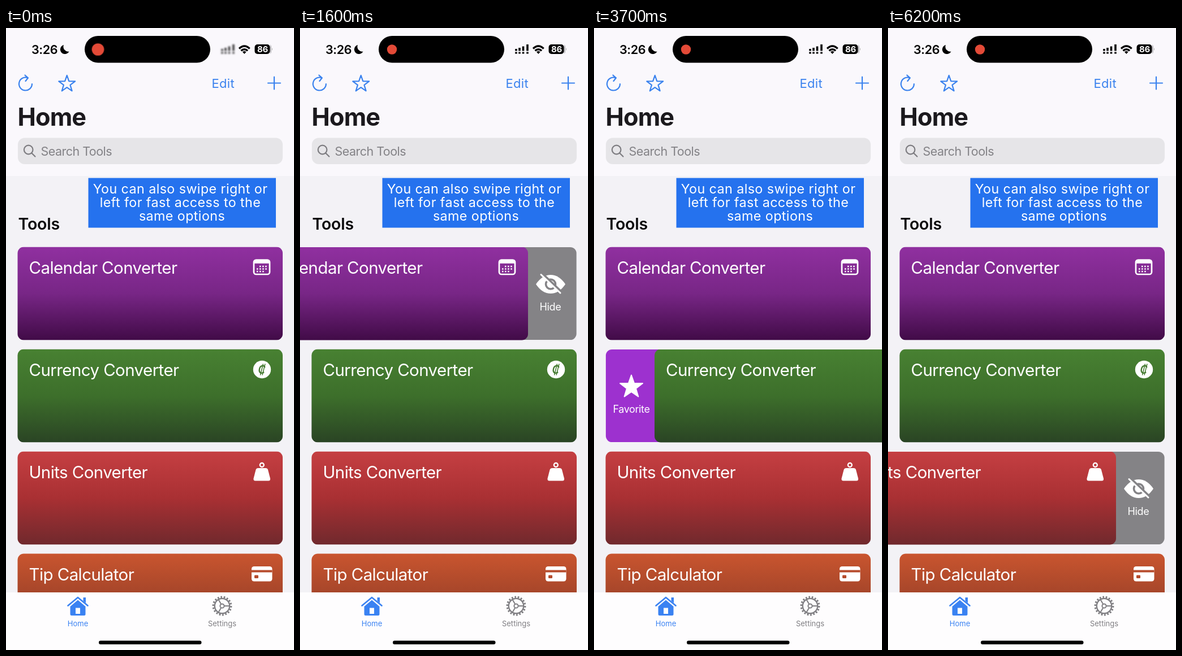
Write an HTML page that moves like this. It is 509x1101 px and loops after 6.3 s.

```html
<!DOCTYPE html>
<html lang="en">
<head>
<meta charset="utf-8">
<title>Swipe actions</title>
<style>
  html, body { margin: 0; width: 100%; height: 100%; overflow: hidden; background: #f3f2f6; }
  svg { display: block; width: 100%; height: 100%; }
  text { font-family: Inter, "Liberation Sans", sans-serif; font-optical-sizing: none; letter-spacing: -.02em; }
  .mid { text-anchor: middle; }
  .title { font-size: 29.5px; fill: #fff; }
  .action { font-size: 18px; fill: #fff; text-anchor: middle; }
  .tab { font-size: 13px; letter-spacing: 0; text-anchor: middle; }
  .banner { font-size: 23.3px; letter-spacing: .4px; fill: #fff; text-anchor: middle; }
  .line { fill: none; stroke: #3a82ee; stroke-width: 2.2; stroke-linecap: round; stroke-linejoin: round; }

  .card, .dot, .signal { animation: 6300ms linear infinite; }
  #calendar { animation-name: calendar; }
  #currency { animation-name: currency; }
  #units { animation-name: units; }
  .dot { animation-name: dot; transform-origin: 162.5px 38px; }
  .signal { animation-name: signal; }

  @keyframes calendar {
    0%, 14.29% { transform: none; animation-timing-function: ease-in-out; }
    22.22%, 50% { transform: translateX(-86px); animation-timing-function: ease-in-out; }
    56.35%, 100% { transform: none; }
  }
  @keyframes currency {
    0%, 46.83% { transform: none; animation-timing-function: ease-out; }
    54.76%, 74.6% { transform: translateX(86.5px); animation-timing-function: ease-in-out; }
    80.95%, 100% { transform: none; }
  }
  @keyframes units {
    0%, 69.4% { transform: none; animation-timing-function: ease-out; }
    77.3%, 100% { transform: translateX(-86px); }
  }
  @keyframes dot {
    0%, 1.5% { transform: scale(1.25); }
    6%, 100% { transform: none; }
  }
  @keyframes signal {
    0%, 1.6% { filter: blur(1.6px); opacity: .75; }
    4%, 100% { filter: none; opacity: 1; }
  }
</style>
</head>
<body>
<svg viewBox="0 0 509 1101" preserveAspectRatio="none">
  <defs>
    <linearGradient id="purple" x2="0" y2="1">
      <stop stop-color="#9030a0"/><stop offset=".5" stop-color="#782686"/><stop offset="1" stop-color="#410b47"/>
    </linearGradient>
    <linearGradient id="green" x2="0" y2="1">
      <stop stop-color="#488132"/><stop offset=".5" stop-color="#3d6f2b"/><stop offset="1" stop-color="#2a4424"/>
    </linearGradient>
    <linearGradient id="red" x2="0" y2="1">
      <stop stop-color="#c53f42"/><stop offset=".5" stop-color="#a93033"/><stop offset="1" stop-color="#70292d"/>
    </linearGradient>
    <linearGradient id="orange" x2="0" y2="1">
      <stop stop-color="#c9552f"/><stop offset=".5" stop-color="#a04329"/><stop offset="1" stop-color="#6a2e20"/>
    </linearGradient>
    <path id="star" d="M0-10 2.35-3.24 9.51-3.09 3.8 1.24 5.88 8.09 0 4-5.88 8.09-3.8 1.24-9.51-3.09-2.35-3.24Z"
      vector-effect="non-scaling-stroke" stroke-linejoin="round"/>
    <g id="hide">
      <rect x="375" y=".4" width="113.6" height="164.2" rx="11" fill="#848386"/>
      <path d="M417 66Q428 49.5 443 49.5T469 66Q458 82.5 443 82.5T417 66Z" fill="#fff"/>
      <circle cx="443" cy="66" r="8.5" fill="none" stroke="#848386" stroke-width="3.6"/>
      <path d="M428.5 47.5 462.500 80" stroke="#848386" stroke-width="4"/>
      <path d="M426 49 460 81.5" stroke="#fff" stroke-width="3" stroke-linecap="round"/>
      <text class="action" x="442.5" y="112.5">Hide</text>
    </g>
    <rect id="face" x="20.5" width="468.5" height="165" rx="11"/>
  </defs>

  <rect width="509" height="1101" fill="#f3f2f6"/>
  <rect width="509" height="262" fill="#faf8fc"/>

  <!-- status bar -->
  <text x="45" y="45.7" font-size="21.6" font-weight="600">3:26</text>
  <path d="M102 30A8.2 8.2 0 1 0 111.5 41.5 8.5 8.5 0 0 1 102 30Z"/>
  <rect x="139" y="14" width="222" height="47.5" rx="23.7"/>
  <circle class="dot" cx="162.5" cy="38" r="8.7" fill="#e34a37"/>
  <g class="signal" stroke="#000" stroke-width="3.6">
    <path d="M382 37v3.5M388 35v5.5M394.5 32.5v8M402 29v11.5"/>
    <path d="M380.2 44h3.6M386.2 44h3.6M392.7 44h3.6M400.2 44h3.6" stroke-width="3.2"/>
  </g>
  <g fill="none" stroke="#000" stroke-width="3.3">
    <path d="M412 36.5Q421.3 27.5 430.6 36.5"/>
    <path d="M415.5 40.3Q421.3 35 427.1 40.3"/>
  </g>
  <path d="M418 42.3Q421.3 39.8 424.6 42.3L421.3 46Z"/>
  <rect x="439.5" y="29" width="27" height="17" rx="5"/>
  <path d="M467 29.5q2 1.5 2 4v8q0 2.5-2 4" fill="#bdbcc0"/>
  <path d="M470 35q2 2.5 0 5Z" fill="#aaa"/>
  <text class="mid" x="453.5" y="43" font-size="15" font-weight="700" fill="#fff">86</text>

  <!-- navigation -->
  <g class="line">
    <path d="M46 99A11.5 11.5 0 1 1 38.5 88.2M33.5 83.5 39 88.3 34.5 94"/>
    <use href="#star" transform="translate(107.7 99) scale(1.52)"/>
    <path d="M463 97.5H485M474 86.5V108.5"/>
  </g>
  <text x="363.5" y="106" font-size="22" style="letter-spacing:.015em" fill="#3a82ee">Edit</text>
  <text x="20.5" y="173" font-size="43.3" font-weight="700" fill="#1b191d">Home</text>
  <rect x="21" y="194.5" width="468" height="46.5" rx="12" fill="#e6e5e8"/>
  <g class="line" style="stroke:#7d7c80">
    <circle cx="39.7" cy="215.5" r="7.8"/>
    <path d="M45.5 221.5 51.5 227.5"/>
  </g>
  <text x="61.5" y="225.8" font-size="21.5" style="letter-spacing:-.025em" fill="#838286">Search Tools</text>
  <text x="21.5" y="357" font-size="28.6" font-weight="600" style="letter-spacing:-.008em" fill="#0c0b0d">Tools</text>

  <rect x="145.5" y="265.5" width="331.5" height="88" fill="#2572ee"/>
  <text class="banner" x="308" y="292.5">You can also swipe right or</text>
  <text class="banner" x="308" y="317">left for fast access to the</text>
  <text class="banner" x="311" y="341">same options</text>

  <!-- cards -->
  <g transform="translate(0 387.5)">
    <use href="#hide"/>
    <g class="card" id="calendar">
      <use href="#face" fill="url(#purple)"/>
      <text class="title" x="40.5" y="47.2">Calendar Converter</text>
      <rect x="438" y="23" width="28" height="25.5" rx="4" fill="none" stroke="#fff" stroke-width="2.7"/>
      <path d="M438 26.5H466" stroke="#fff" stroke-width="5.5"/>
      <g stroke="#fff" stroke-width="2.5" stroke-dasharray="2.5 2.6">
        <path d="M448 34.5H462M443 39H462M443 43.5H457"/>
      </g>
    </g>
  </g>

  <g transform="translate(0 568.5)">
    <rect x="20.9" y=".4" width="108" height="164.2" rx="11" fill="#9d31cf"/>
    <use href="#star" transform="translate(66 67) scale(2.1)" fill="#fff" stroke="#fff" stroke-width="2"/>
    <text class="action" x="66" y="112.5">Favorite</text>
    <g class="card" id="currency">
      <use href="#face" fill="url(#green)"/>
      <text class="title" x="40.5" y="47.2">Currency Converter</text>
      <circle cx="452.5" cy="36" r="15.7" fill="#fff"/>
      <g fill="none" stroke="#447a30">
        <path d="M457.5 32.5C456 27.5 449.5 28.5 448 35S451 44.5 456 40.5" stroke-width="2.4"/>
        <path d="M454.5 26 449.5 46M458 26 453 46" stroke-width="1.5"/>
      </g>
    </g>
  </g>

  <g transform="translate(0 749.5)">
    <use href="#hide"/>
    <g class="card" id="units">
      <use href="#face" fill="url(#red)"/>
      <text class="title" x="40.5" y="47.2">Units Converter</text>
      <circle cx="452.3" cy="24" r="3.5" fill="none" stroke="#fff" stroke-width="2.3"/>
      <path d="M445.5 29.5H459Q462 29.5 463 32.5L467 48Q467.5 52 464 52H440.5Q437 52 437.5 48L441.5 32.5Q442.5 29.5 445.5 29.5Z" fill="#fff"/>
    </g>
  </g>

  <g transform="translate(0 930.5)">
    <use href="#face" fill="url(#orange)"/>
    <text class="title" x="40.5" y="47.2">Tip Calculator</text>
    <rect x="434" y="22.5" width="36.5" height="26.5" rx="4.5" fill="#fff"/>
    <path d="M434 31H470.5" stroke="#b74c2c" stroke-width="4"/>
    <rect x="439" y="38" width="7" height="5.5" rx="1.2" fill="#b54b2c"/>
  </g>

  <!-- tab bar -->
  <rect y="999" width="509" height="102" fill="#fefdfe"/>
  <g fill="#3a82f2">
    <path d="M113.5 1024 127 1012.5 140.5 1024V1037.5Q140.5 1040 138 1040H116Q113.5 1040 113.5 1037.5Z"/>
    <path d="M136.5 1008H141V1018L136.5 1014Z"/>
    <path d="M109.5 1022.5 127 1008 144.5 1022.5" fill="none" stroke="#3a82f2" stroke-width="2.7" stroke-linecap="round" stroke-linejoin="round"/>
    <path d="M123 1026.5H131V1037H123Z" fill="#fefdfe"/>
    <text class="tab" x="127" y="1059">Home</text>
  </g>
  <g fill="none" stroke="#7f7e82">
    <circle cx="382" cy="1023" r="15.8" stroke-width="3.2" pathLength="36" stroke-dasharray="1 1"/>
    <circle cx="382" cy="1023" r="13.2" stroke-width="2.3"/>
    <circle cx="382" cy="1023" r="3.6" stroke-width="2"/>
    <path d="M386 1023H395M380 1019.5 375.5 1011.7M380 1026.5 375.5 1034.3" stroke-width="2"/>
  </g>
  <text class="tab" x="382" y="1059" fill="#7f7e82">Settings</text>
  <rect x="164" y="1084.5" width="181.5" height="6.5" rx="3.25"/>
</svg>
</body>
</html>
```
